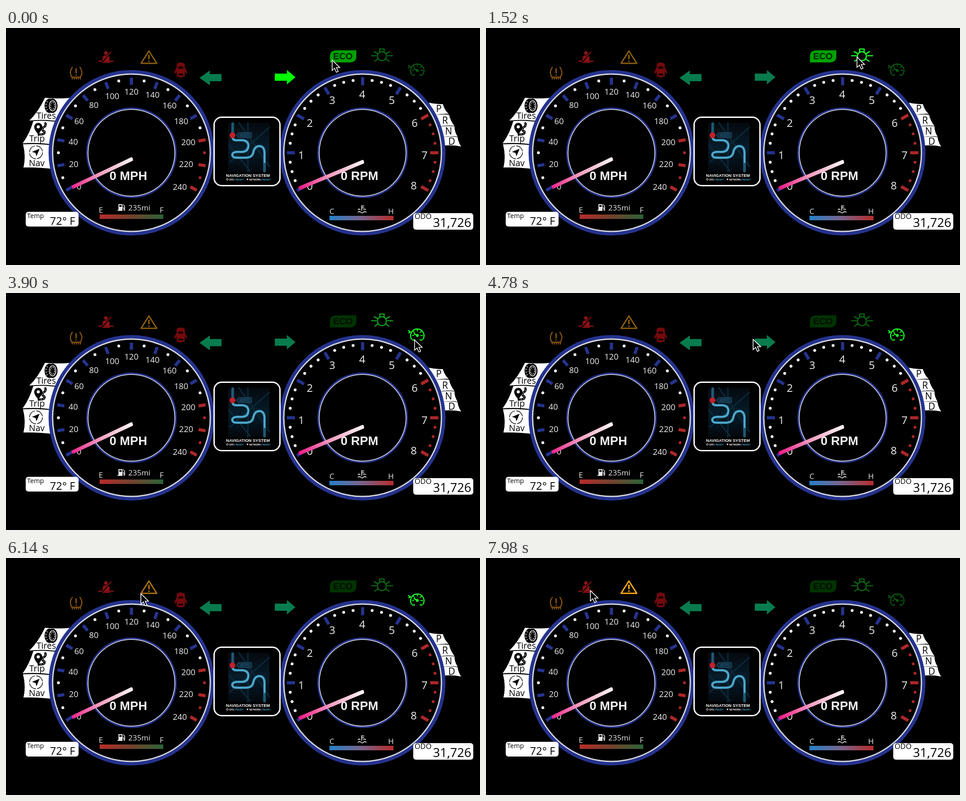
These frames come from a looping animation (1058 px wide and 530 px high, 8000 ms). An HTML page:

```html
<!DOCTYPE html>
<html>
<head>
<meta charset="utf-8">
<style>
html, body { margin: 0; width: 100%; height: 100%; overflow: hidden; background: #000; }
svg { display: block; width: 1058px; height: 530px; }
text { font-family: "Open Sans", "Noto Sans", sans-serif; }
.bold { font-family: "Liberation Sans", Arial, sans-serif; font-weight: bold; }
.mid { text-anchor: middle; }
.line { fill: none; stroke-linecap: round; stroke-linejoin: round; }
</style>
</head>
<body>
<svg viewBox="0 0 1058 530">
  <defs>
    <linearGradient id="fuel"><stop stop-color="#b52b29"/><stop offset=".5" stop-color="#73412d"/><stop offset="1" stop-color="#2b6338"/></linearGradient>
    <linearGradient id="heat"><stop stop-color="#2680c8"/><stop offset=".5" stop-color="#79638a"/><stop offset="1" stop-color="#b62c2c"/></linearGradient>
    <linearGradient id="pink" gradientUnits="userSpaceOnUse" x1="0" y1="0" x2="-138" y2="63"><stop stop-color="#fff3f5"/><stop offset=".5" stop-color="#f4a0c2"/><stop offset="1" stop-color="#ee1c87"/></linearGradient>
    <linearGradient id="map" x2="0" y2="1"><stop stop-color="#04090e"/><stop offset=".5" stop-color="#071c2a"/><stop offset="1" stop-color="#03080d"/></linearGradient>
  </defs>

  <!-- side tabs -->
  <g fill="#fff">
    <path d="M87 156Q115 159 146 156L122 209Q85 203 52 207Q72 188 87 156Z"/>
    <path d="M61 208Q90 206 122 211L108 261Q70 255 37 258Q52 238 61 208Z"/>
    <path d="M38 260Q75 258 108 263L110 316Q70 311 39 312Q45 288 38 260Z"/>
    <path d="M944 167Q960 171 975 170Q979 184 988 192Q972 191 957 195Z"/>
    <path d="M957 195Q973 192 989 194Q992 208 1001 219Q982 216 966 221Z"/>
    <path d="M966 221Q984 218 1001 220Q1001 232 1008 243Q992 240 974 244Z"/>
    <path d="M974 244Q992 241 1008 244Q1009 255 1016 265Q998 261 976 263Z"/>
  </g>
  <g font-size="19.5">
    <text x="68" y="203">Tires</text><text x="52" y="254">Trip</text><text x="51" y="309">Nav</text>
  </g>
  <g font-size="21" class="mid">
    <text x="966" y="188">P</text><text x="980" y="214">R</text><text x="988" y="238">N</text><text x="995" y="261">D</text>
  </g>
  <g>
    <ellipse cx="97" cy="174" rx="11" ry="16"/>
    <ellipse cx="104" cy="174" rx="11" ry="16"/>
    <ellipse cx="104" cy="174" rx="7.5" ry="11.5" fill="none" stroke="#fff" stroke-width="1.5"/>
    <ellipse cx="104" cy="174" rx="4.5" ry="8" fill="none" stroke="#bbb" stroke-width="2" stroke-dasharray="3 2"/>
    <path d="M89 164l5 2M87 170l5 1M87 177l5 0M89 184l5-2" stroke="#fff" stroke-width="1"/>
    <path d="M72 238Q62 226 63 221A9 9 0 0 1 81 221Q81 227 72 238Z"/>
    <circle cx="72" cy="221" r="3.5" fill="#fff"/>
    <path class="line" d="M73 238Q87 239 86 232Q79 228 82 223Q90 220 88 213" stroke="#000" stroke-width="5"/>
    <path class="line" d="M77 238Q87 238 86 232Q79 228 82 223Q90 220 88 213" stroke="#fff" stroke-width="1" stroke-dasharray="3 3"/>
    <circle cx="67" cy="278" r="14.5" fill="none" stroke="#000" stroke-width="1.4" stroke-dasharray="20 2.8"/>
    <path d="M75 270L58 277L66 279.500L68 287Z"/>
  </g>

  <g id="dials"></g>

  <!-- fuel and coolant -->
  <rect x="209" y="417" width="142" height="10" fill="url(#fuel)"/>
  <rect x="722" y="420" width="143" height="10" fill="url(#heat)"/>
  <g fill="#e8e8e8" font-size="17">
    <text x="207" y="413">E</text><text x="343" y="413">F</text><text x="273" y="408">235mi</text>
    <text x="722" y="416">C</text><text x="853" y="416">H</text>
    <path d="M251 394h9v15h-11v-2h2Z"/><path d="M253 396h5v4h-5Z" fill="#000"/>
    <path class="line" d="M261 402h2v5q2 2 2-1v-7l-3-4" stroke="#e8e8e8" stroke-width="1.5"/>
    <path class="line" d="M794 397v11M794 398h5M794 402h5M786 406q2-2 4 0M798 406q3-2 5 0M786 412q3-3 6 0t6 0t6 0" stroke="#e8e8e8" stroke-width="1.7"/>
  </g>

  <!-- readouts -->
  <rect x="44" y="411" width="118" height="33" rx="6" fill="#fff"/>
  <rect x="909" y="414" width="134" height="37" rx="6" fill="#fff"/>
  <text x="47" y="425" font-size="14.5">Temp</text><text x="98" y="440" font-size="24">72° F</text>
  <text x="912" y="427" font-size="16.5">ODO</text><text x="953" y="445" font-size="27.500">31,726</text>

  <!-- navigation screen -->
  <rect x="464.500" y="199.500" width="147" height="153" rx="17" stroke="#fff" stroke-width="3"/>
  <rect x="496" y="212" width="92" height="110" fill="url(#map)"/>
  <path class="line" d="M500 300L588 222M520 212L588 310M498 262L545 320M540 212v110" stroke="#0b2939" stroke-width="3"/>
  <path class="line" d="M506 214V244Q506 251 514 251H528Q541 252 541 264Q540 276 528 277H515Q505 278 505 284Q506 290 515 290H535Q550 290 552 278Q555 264 566 264Q577 265 577 280V320" stroke="#1d5975" stroke-width="6"/>
  <path class="line" d="M506 246Q507 251 514 251H528Q541 252 541 264Q540 276 528 277H515Q505 278 505 284Q506 290 515 290H535Q550 290 552 278Q555 264 566 264Q577 265 577 280V300" stroke="#4fa9cb" stroke-width="4"/>
  <circle cx="505.500" cy="240" r="6.500" fill="#c4202a"/>
  <path d="M514 240l5-6h29v11h-29Z" fill="#102c3e" stroke="#28617d"/>
  <text x="522" y="243" font-size="9" fill="#28617d">400ft</text>
  <g class="bold" fill="#fff">
    <text class="bold mid" x="540" y="332.500" font-size="9.300">NAVIGATION SYSTEM</text>
    <circle cx="494" cy="338.500" r="2" fill="none" stroke="#fff"/>
    <text class="bold" x="498" y="340.500" font-size="5">GPS / <tspan fill="#3fa5cf">READY</tspan></text>
    <path d="M537 337h4l-2 4Z"/>
    <text class="bold" x="543" y="340.500" font-size="5">NETWORK / <tspan fill="#3fa5cf">READY</tspan></text>
  </g>

  <!-- indicators -->
  <g stroke="#86530f" class="line" stroke-width="2.400">
    <path d="M148 88Q140 99 147 110H166Q173 99 165 88M148 111v3M152.500 111v3M157 111v3M161.500 111v3M166 111v3"/>
    <path d="M156.500 91v9M156.500 105v.2" stroke-width="3"/>
  </g>
  <g fill="#8d1216">
    <circle cx="223" cy="56" r="4"/>
    <path d="M216 73V65Q217 61 223 61Q230 61 231 65V73Z"/>
    <path d="M206 73h34v2.500h-34ZM215 76h17v2h-17Z"/>
    <path d="M214 76L234 54" stroke="#000" stroke-width="4"/><path d="M213 75L235 53" stroke="#8d1216" stroke-width="2"/>
  </g>
  <g fill="#72090d">
    <path d="M381 80Q390 74 399 80V108Q390 113 381 108Z"/><path d="M381 88l-5 10v5l5-5ZM399 88l5 10v5l-5-5Z"/>
    <path d="M384 87Q390 84 396 87L395 91H385ZM385 102H395L396 106H384Z" fill="#180002"/>
  </g>
  <g id="warn">
    <path class="line" d="M319 51.500L336.500 79H301.500Z" stroke="#ffa916" stroke-width="3"/>
    <path class="line" d="M319 61v7.500M319 74v.3" stroke="#ffa916" stroke-width="3.500"/>
  </g>
  <path d="M432 111.500L455 95V103H481V119H455V128Z" fill="#087c4d"/>
  <path d="M646 110L627 94V102H600V118H627V126Z" fill="#087c4d"/>
  <path id="turn" d="M646 110L627 94V102H600V118H627V126Z" fill="#0f0"/>
  <g id="eco">
    <path d="M735 50H782V65Q781 77 767 77H723V62Q724 51 735 50Z" fill="#0f0"/>
    <text class="bold mid" x="752" y="70" font-size="20" fill="#003800">ECO</text>
  </g>
  <g id="bulb" class="line" stroke="#1bff2c" stroke-width="2.600">
    <circle cx="839" cy="63" r="10"/>
    <path d="M834 53V47H844V53M816 62H826M852 62H863M822 53L829 57M856 53L849 57M823 74L831 69M855 74L847 69"/>
  </g>
  <g id="cruise" class="line" stroke="#1bff2c" stroke-width="2.300">
    <path d="M905 103A15 15 0 1 1 931 103M907 105H912M924 105H929"/>
    <path d="M907 95H910M909 86L912 88M918 82V85M927 86L924 88M930 95H926" stroke-width="2"/>
    <path d="M911 91L918 95" stroke-width="3"/><circle cx="918" cy="95" r="2"/>
    <path d="M898 84L903 87L899 89"/>
  </g>
  <path id="cursor" d="M0 0V23L5.500 18L9.500 27L13.500 25L9.500 16.500H17Z" fill="#000" stroke="#fff" stroke-width="1.600"/>
</svg>

<script>
const $ = id => document.getElementById(id);
const BLUE = '#25338e', RED = '#ad2729';

const ring = (r, width, color, fill = 'none') =>
  `<circle r="${r}" fill="${fill}" stroke="${color}" stroke-width="${width}"/>`;

// marks: number of steps; every "per" steps is a bar, the others are dots
function dial(cx, marks, per, bar, redFrom, labels, size, unit, tip) {
  let s = ring(181, 8, BLUE, '#000') + ring(176, 3, '#d4d4de') +
    ring(99.5, 3.5, BLUE) + ring(97, 2, '#c9c9dc');
  for (let i = 0; i <= marks; i++) {
    const red = i >= redFrom, turn = `transform="rotate(${-120 + 240 * i / marks})"`;
    s += i % per
      ? `<circle cy="-163" r="3.2" fill="${red ? RED : '#fff'}" ${turn}/>`
      : `<rect x="-3.5" y="${-160 - bar / 2}" width="7" height="${bar}" fill="${red ? RED : BLUE}" ${turn}/>`;
  }
  labels.forEach(([x, y], i) => s += `<text class="mid" x="${x - cx}" y="${y - 279 + size * .36}"
    font-size="${size}" fill="#eee">${unit == 'MPH' ? i * 20 : i}</text>`);
  const [nx, ny, len, angle] = tip;
  s += `<text class="bold mid" x="-7" y="61" font-size="27.5" fill="#f2f2f2">0 ${unit}</text>
    <path transform="translate(${nx - cx} ${ny - 279}) rotate(${angle})" class="line"
      style="fill:url(#pink);stroke:url(#pink)" stroke-width="5" d="M0 -1.5L${-len} 61L${-len + 1} 64L1 2Z"/>`;
  return `<g transform="translate(${cx} 279)">${s}</g>`;
}

$('dials').innerHTML =
  dial(280, 24, 2, 16, 20, [[163, 354], [151, 304], [150, 254], [163, 208], [196, 172], [237, 152],
    [280, 142], [327, 149], [365, 173], [391, 208], [407, 255], [402, 304], [388, 355]],
    18.5, 'MPH', [280, 293, 131, 0]) +
  dial(796, 32, 4, 18, 24, [[678, 353], [659, 284], [678, 212], [728, 161], [795, 148], [861, 161],
    [912, 212], [934, 284], [910, 352]],
    24, 'RPM', [796, 299, 139, 1.5]);

// eased value at time t from [time, value] pairs
function at(t, keys) {
  const n = keys.findIndex(k => k[0] > t);
  if (n == 0) return keys[0][1];
  if (n < 0) return keys[keys.length - 1][1];
  const [t0, a] = keys[n - 1], [t1, b] = keys[n], p = (t - t0) / (t1 - t0);
  return a + (b - a) * p * p * (3 - 2 * p);
}

const glow = {
  turn: [[100, 1], [700, 0]],
  eco: [[0, .63], [450, 1], [1150, 1], [1520, .63], [2000, .2]],
  bulb: [[900, .4], [1400, 1], [3500, 1], [3900, .62], [4080, .4]],
  cruise: [[3400, .35], [3850, 1], [7050, 1], [7700, .35]],
  warn: [[5950, .55], [6500, 1]]
};
const path = [[0, 728, 72], [700, 740, 70], [1400, 828, 65], [1700, 828, 65], [2500, 840, 65],
  [2900, 840, 65], [3750, 912, 105], [4200, 912, 105], [5400, 249, 102], [5650, 249, 102],
  [6450, 327, 69], [7000, 327, 69], [7900, 233, 73]];
const xs = path.map(([t, x]) => [t, x]), ys = path.map(([t, , y]) => [t, y]);

function draw(now) {
  const t = now % 8000;
  for (const id in glow) $(id).setAttribute('opacity', at(t, glow[id]));
  $('cursor').setAttribute('transform', `translate(${at(t, xs)} ${at(t, ys)})`);
  requestAnimationFrame(draw);
}
draw(0);
</script>
</body>
</html>
```
